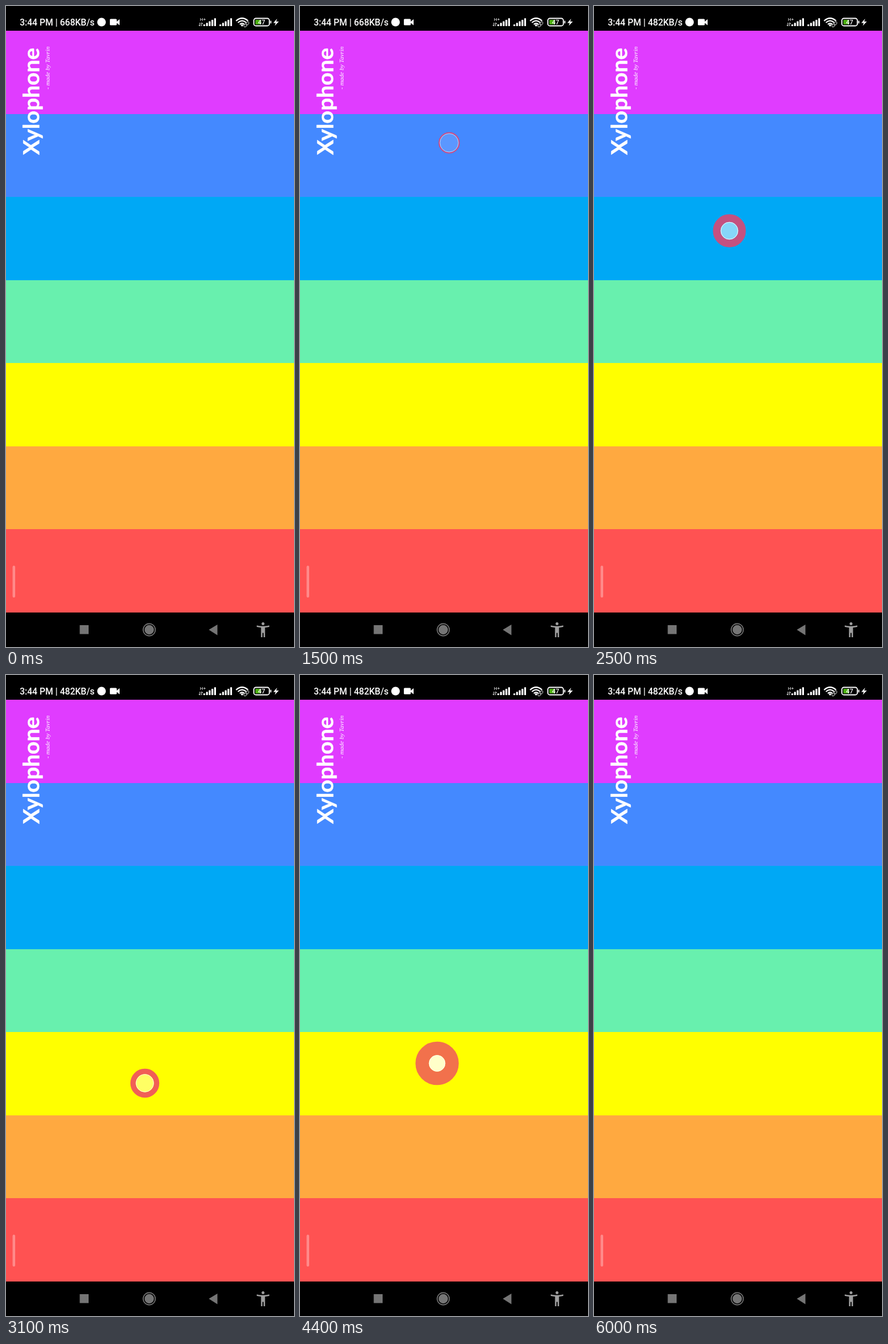
Write an HTML page that moves like this. It is 502 by 1115 pixels and loops after 6.1 s.

```html
<!DOCTYPE html>
<html lang="en">
<head>
<meta charset="utf-8">
<title>Xylophone</title>
<style>
  html, body { margin: 0; width: 100%; height: 100%; overflow: hidden; background: #000; }
  svg { display: block; width: 100%; height: 100%; }
  text { fill: #fff; }
  .status { font: 500 15.6px Roboto, sans-serif; }
  .title { font: 700 39px Lato, sans-serif; stroke: #fff; stroke-width: .5; stroke-linejoin: round; }
  .credit { font: italic 11px "Liberation Serif", serif; }
  .tiny { font: 8px Roboto, sans-serif; }
  .charge { font: 500 11px Roboto, sans-serif; }
</style>
</head>
<body>
<svg viewBox="0 0 502 1115">
  <rect width="502" height="1115"/>
  <g id="bands"></g>

  <text class="status" x="24" y="34">3:44 PM | <tspan id="speed"></tspan></text>
  <g fill="#fff">
    <circle cx="166.500" cy="28" r="7.500"/>
    <path d="M182.500 22.500H191.500Q193 22.500 193 24V27L198 23V33.500L193 29.500V32Q193 33.500 191.500 33.500H182.500Q181 33.500 181 32V24Q181 22.500 182.500 22.500Z"/>
    <text class="tiny" x="338" y="26">H+</text>
    <path d="M338 29V35M336 33L338 35M341 35V29M343 31L341 29" fill="none" stroke="#fff"/>
    <g id="signals"></g>
    <path d="M401 26Q411.500 16.500 422 26M404.200 29Q411.500 22.300 418.800 29M407.500 32Q411.500 28.300 415.500 32" fill="none" stroke="#fff" stroke-width="2.200"/>
    <path d="M409 33L411.500 36L414 33Q411.500 31 409 33Z"/>
    <g fill="none" stroke="#aaa" stroke-width="1.200" transform="rotate(-45 419 32)">
      <rect x="413.500" y="30" width="6" height="4" rx="2"/>
      <rect x="418.500" y="30" width="6" height="4" rx="2"/>
    </g>
    <rect x="432" y="21.500" width="27" height="13" rx="3.500" fill="none" stroke="#fff" stroke-width="1.800"/>
    <rect x="434.500" y="24" width="10" height="8" rx="1" fill="#4caf10"/>
    <rect x="460.500" y="25.500" width="2" height="5" rx="1"/>
    <text class="charge" x="445.500" y="32" text-anchor="middle">47</text>
    <path d="M472.500 22L466 29.500H470L468.500 34.500L475.500 27H471Z"/>
  </g>

  <text class="title" transform="translate(58 259) rotate(-90)">Xylophone</text>
  <text class="credit" transform="translate(75.500 145) rotate(-90)">- made by Tavrin</text>
  <rect x="11.500" y="973.500" width="4.500" height="55.500" rx="2.200" fill="#ff8a8a"/>

  <g fill="#757575">
    <rect x="128.500" y="1077" width="15.500" height="15.500"/>
    <circle cx="249.700" cy="1085" r="10.600" fill="none" stroke="#757575" stroke-width="1.600"/>
    <circle cx="249.700" cy="1085" r="8.200"/>
    <path d="M353.500 1085L368.500 1076V1094.500Z"/>
  </g>
  <g fill="#9e9e9e">
    <circle cx="448" cy="1074.500" r="2.500"/>
    <path d="M437 1077.500Q448 1080 459 1077.500V1080Q455 1081 451.500 1081.300V1098H449V1090.500H447V1098H444.500V1081.300Q441 1081 437 1080Z"/>
  </g>

  <g id="touches"></g>
</svg>
<script>
const LOOP = 6100, STEP = 100, RIPPLE = 300, SPEED_CHANGE = 1800;
const byId = id => document.getElementById(id);

function add(parent, tag, attributes) {
  const node = document.createElementNS("http://www.w3.org/2000/svg", tag);
  for (const [name, value] of Object.entries(attributes)) node.setAttribute(name, value);
  return parent.appendChild(node);
}

const colors = ["#e03cff", "#4489ff", "#00a8f5", "#68f0ae", "#ffff00", "#ffa940", "#ff5252"];
colors.forEach((fill, i) => {
  const edge = n => Math.round(43 + n * 144.5);
  add(byId("bands"), "rect", { x: 0, y: edge(i), width: 502, height: edge(i + 1) - edge(i), fill });
});

for (const left of [344, 372]) {
  for (let i = 0; i < 5; i++) {
    const height = 3 + i * 2.7;
    add(byId("signals"), "rect", { x: left + i * 4.7, y: 35 - height, width: 3.2, height, rx: .8 });
  }
}

// Three-note runs, each starting one bar lower: [start ms, x, y].
const taps = [
  [280, 262, 118], [683, 267, 264], [1090, 252, 398],
  [1495, 260, 238], [1810, 250, 391], [2120, 246, 540],
  [2440, 236, 391], [2750, 240, 538], [3060, 242, 710],
  [3373, 245, 536], [3675, 240, 690], [3975, 242, 802],
  [4277, 239, 675.5], [4590, 242, 836], [4910, 244, 944]
];

function drawTouch(x, y, u) {
  const grow = 1 - (1 - u) ** 2;
  const fade = 1 - grow ** 5;
  const outer = 17.5 + 31 * grow;
  const inner = 16.6 - 3.6 * grow;
  const disc = { cx: x, cy: y, r: inner };
  const layer = byId("touches");
  add(layer, "circle", {
    cx: x, cy: y, r: (outer + inner) / 2, fill: "none",
    stroke: "#ee3e68", "stroke-width": outer - inner, "stroke-opacity": .83 * fade
  });
  add(layer, "circle", { ...disc, fill: "#fff", "fill-opacity": Math.min(.95, .08 + 1.25 * grow) * fade });
  add(layer, "circle", { ...disc, r: inner - .5, fill: "none", stroke: "#fff", "stroke-opacity": Math.min(.9, .5 + grow) * fade });
}

function render() {
  const time = Math.floor(performance.now() % LOOP / STEP) * STEP;
  byId("speed").textContent = time < SPEED_CHANGE ? "668KB/s" : "482KB/s";
  byId("touches").replaceChildren();
  for (const [start, x, y] of taps) {
    const u = (time - start) / RIPPLE;
    if (u >= 0 && u < 1) drawTouch(x, y, u);
  }
  requestAnimationFrame(render);
}
render();
</script>
</body>
</html>
```
